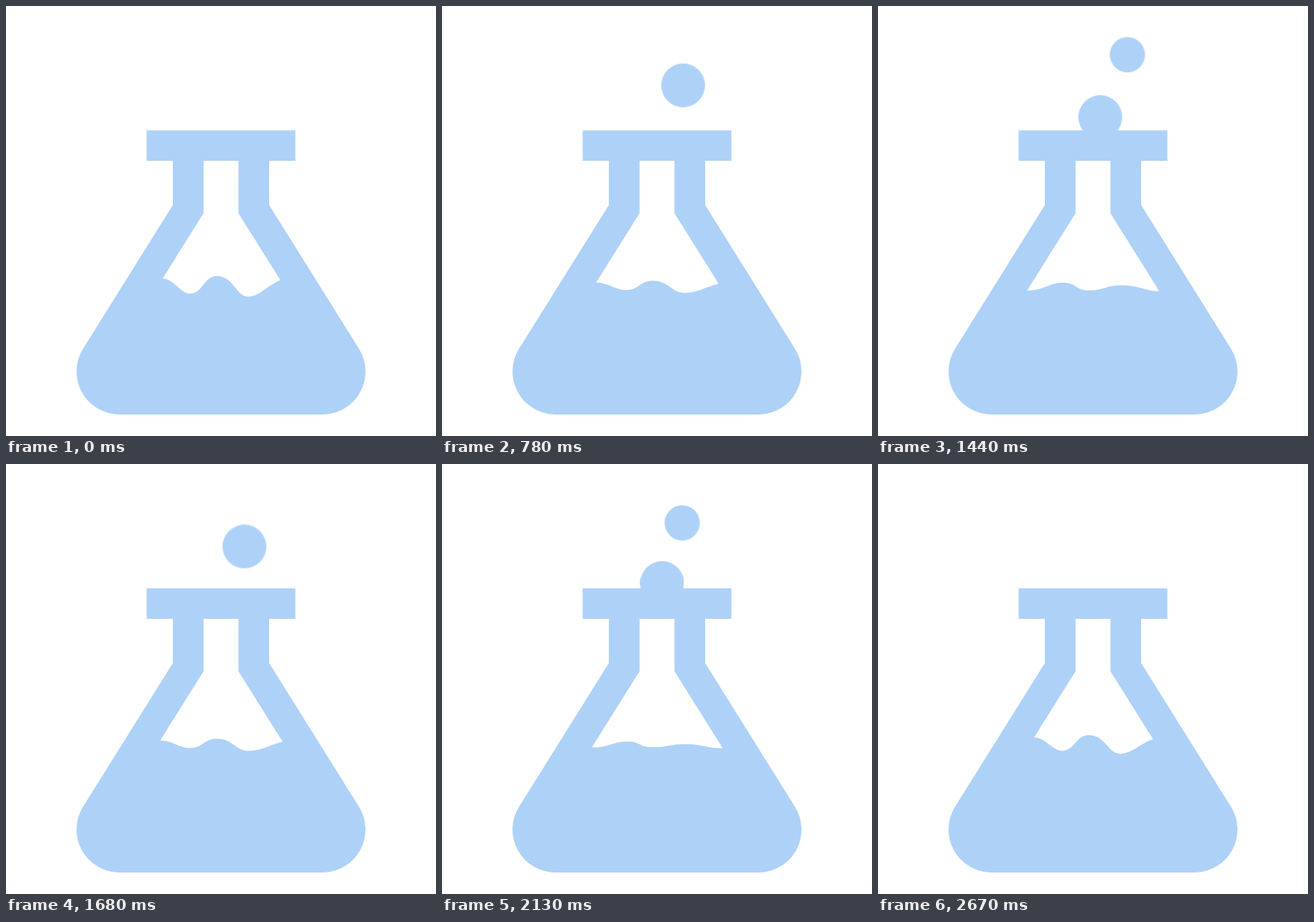
Write an HTML page without scripts that moves like this. It is 500x500 px and loops after 2.7 s.

```html
<!DOCTYPE html>
<html lang="en">
<head>
<meta charset="utf-8">
<title>Bubbling flask</title>
<style>
  :root { --blue: #aed1f7; }
  html, body { margin: 0; width: 100%; height: 100%; overflow: hidden; background: #fff; }
  svg { position: absolute; left: 0; top: 0; width: 500px; height: 500px; fill: var(--blue); }
  .hollow { fill: #fff; }

  .liquid { animation: slosh 450ms linear infinite alternate; }
  @keyframes slosh {
    from { d: path("M150 317 H183 C196 318 203 334.5 214 334.5 C229 334.5 230 314 245 314 C265 314 267 338 282 338 C295 338 306 323 319 319 H350 V400 H150 Z"); }
    to { d: path("M150 334.1 H171.2 C192 334.1 198 318.4 214.5 318.4 C233 318.4 228 334.9 246 334.9 C262 334.9 265 321.4 284 321.4 C304 321.4 315 334.5 328.6 334.5 H350 V400 H150 Z"); }
  }

  /* Bubbles stay hidden until they clear the rim. */
  .air { position: absolute; left: 0; top: 0; width: 500px; height: 162px; overflow: hidden; }
  .air i {
    position: absolute; left: 0; top: 0; border-radius: 50%;
    background: var(--blue); opacity: 0; offset-rotate: 0deg;
    animation: 2700ms linear calc(var(--puff) + var(--wait)) infinite;
  }
  .small {
    --wait: 60ms; width: 41px; height: 41px; animation-name: rise-small !important;
    offset-path: path("M250 167 C250 150 253.5 137 257 119.5 C264 84 284.5 52.5 316.5 39.5");
  }
  .big {
    --wait: 240ms; width: 51px; height: 51px; animation-name: rise-big !important;
    offset-path: path("M252 172 C252.5 160 254 147 256.5 136 C262 112 278.5 91.6 297.5 75.6");
  }
  @keyframes rise-small {
    from { offset-distance: 0%; opacity: 1; }
    21.111% { offset-distance: 100%; opacity: 1; }
    21.6%, to { offset-distance: 100%; opacity: 0; }
  }
  @keyframes rise-big {
    from { offset-distance: 0%; opacity: 1; }
    25.556% { offset-distance: 100%; opacity: 1; }
    26%, to { offset-distance: 100%; opacity: 0; }
  }
</style>
</head>
<body>
<svg viewBox="0 0 500 500">
  <path d="M163.5 144.5 H336.5 V180 H306 V231.5 L410.4 398.5 A50 50 0 0 1 368 475 H132 A50 50 0 0 1 89.6 398.5 L194 231.5 V180 H163.5 Z"/>
  <path class="hollow" d="M229.7 180 H270.3 V241 L335.5 345 H164.5 L229.7 241 Z"/>
  <path class="liquid" d="M150 317 H183 C196 318 203 334.5 214 334.5 C229 334.5 230 314 245 314 C265 314 267 338 282 338 C295 338 306 323 319 319 H350 V400 H150 Z"/>
</svg>
<div class="air">
  <div style="--puff: 0ms"><i class="small"></i><i class="big"></i></div>
  <div style="--puff: 930ms"><i class="small"></i><i class="big"></i></div>
  <div style="--puff: 1680ms"><i class="small"></i><i class="big"></i></div>
</div>
</body>
</html>
```
